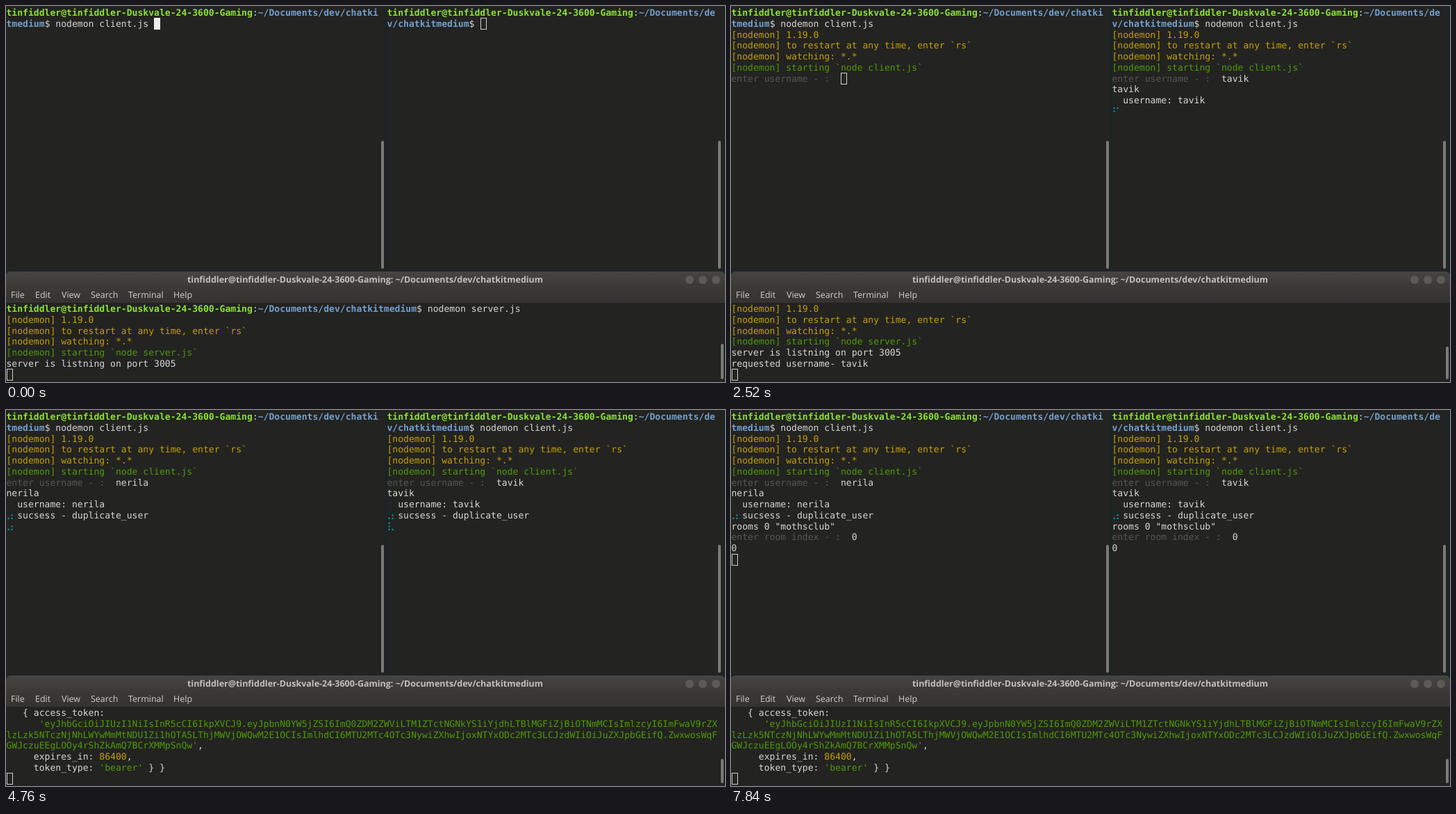
These frames come from a looping animation (1035 by 541 pixels, 8 s). An HTML page:

```html
<!DOCTYPE html>
<html lang="en">
<head>
<meta charset="utf-8">
<title>Terminal chat</title>
<style>
  html, body { margin: 0; width: 100%; height: 100%; overflow: hidden; background: #14262a; }
  #stage { position: relative; width: 1035px; height: 541px; overflow: hidden; text-rendering: geometricPrecision; }
  .pane, .bar, .cursor, #window, #title, .menu, .button { position: absolute; }
  .pane { top: 0; height: 381px; background: #232321; overflow: hidden; }
  #left { left: 0; width: 546px; }
  #right { left: 548px; width: 485px; }
  #server { left: 0; top: 427px; width: 1034px; height: 114px; }
  pre {
    position: absolute; left: .5px; top: 3px; margin: 0; color: #d6d8d2;
    font: 13.09px/15.77px "DejaVu Sans Mono", monospace;
  }
  #server pre { top: 2px; }
  .user { color: #8ae234; font-weight: bold; }
  .path { color: #729fcf; font-weight: bold; }
  .note { color: #c4a000; }
  .good { color: #4e9a06; }
  .dim { color: #555753; }
  svg { width: 7.88px; height: 15px; vertical-align: top; overflow: visible; fill: #06a0b4; }
  .cursor { box-sizing: border-box; width: 9px; height: 17px; border: 1px solid #d0d2cc; }
  .cursor.solid { background: #eeeeec; border-color: #eeeeec; }
  .bar { width: 4px; border-radius: 2px; background: #7a7a76; }
  #window {
    left: 0; top: 382px; width: 1035px; height: 45px; border-radius: 6px 6px 0 0;
    background: linear-gradient(#464541, #3a3935 24px, #343330);
    font: 12.5px/18px "Open Sans", sans-serif; color: #d2d0cb;
  }
  #title { left: 0; width: 1034px; top: 3px; text-align: center; font-weight: bold; color: #c2c0bb; white-space: pre; }
  .menu { top: 25px; }
  .button { top: 6px; width: 12px; height: 12px; border-radius: 50%; background: #5b5a56; }
</style>
</head>
<body>
<div id="stage">
  <div class="pane" id="left"></div>
  <div class="pane" id="right"></div>
  <div id="window"><div id="title"></div></div>
  <div class="pane" id="server"></div>
</div>
<script>
const LOOP = 8000, CELL = 7.88, ROW = 15.77;
const HOST = 'tinfiddler@tinfiddler-Duskvale-24-3600-Gaming';
const PATH = '~/Documents/dev/chatkitmedium';
const ROOM = 'mothsclub';
// Lit braille dots for each spinner position.
const SPIN = ['124', '145', '1456', '456', '3456', '356', '236', '1236', '123', '1234'];

const clients = {
  left: {
    name: 'nerila', wrap: 22, command: 0, run: 210, boot: [420, 490, 560],
    keys: [3010, 3150, 3290, 3430, 3570, 3710], enter: 4060,
    spin: 4340, spinFrom: 4340, step: 80, success: 4760, resume: 4340, spinEnd: 5740, clear: 6020,
    rooms: 6230, index: 6370, join: 6580, hidden: [[4060, 6230], [6860, 7000]]
  },
  right: {
    name: 'tavik', wrap: 14, command: 980, run: 1260, boot: [1400, 1400, 1610],
    keys: [2170, 2170, 2380, 2380, 2380], enter: 2450,
    spin: 2520, spinFrom: 2520, step: 72.5, success: 4340, resume: 4172, spinEnd: 5600, clear: 6230,
    rooms: 6230, index: 7350, join: 7490, hidden: [[1610, 1820], [2450, 6230], [7840, 8000]]
  }
};

const within = (t, [from, to]) => t >= from && t < to;
const span = (kind, text) => [kind, text];
const plain = text => [span('', text)];
const note = text => [span('note', '[nodemon] ' + text)];
const good = text => [span('good', '[nodemon] ' + text)];
const spinAt = (t, from, step) => span('spin', SPIN[Math.floor((t - from) / step) % SPIN.length]);

const bootNotes = [note('1.19.0'), note('to restart at any time, enter `rs`'), note('watching: *.*')];

function clientRows(t, c) {
  const rows = [
    [span('user', HOST), span('', ':'), span('path', PATH.slice(0, c.wrap))],
    [span('path', PATH.slice(c.wrap)), span('', '$ ' + (t >= c.command ? 'nodemon client.js ' : ''))]
  ];
  if (t < c.run) return rows;
  if (t >= c.boot[0]) rows.push(...bootNotes);
  if (t >= c.boot[1]) rows.push(good('starting `node client.js`'));
  if (t < c.boot[2]) return [...rows, []];

  const typed = c.name.slice(0, c.keys.filter(key => t >= key).length);
  rows.push([span('dim', 'enter username - :  '), span('', typed)]);
  if (t < c.enter) return rows;
  rows.push(plain(c.name), plain('  username: ' + c.name));

  if (t < c.spin) return rows;
  const first = spinAt(Math.min(t, c.success - 1), c.spinFrom, c.step);
  if (t < c.success) return [...rows, [first]];
  rows.push([first, span('', ' sucsess - duplicate_user')]);

  if (t < c.clear) return [...rows, [spinAt(Math.min(t, c.spinEnd), c.resume, 80)]];
  if (t < c.rooms) return rows;
  rows.push(plain(`rooms 0 "${ROOM}"`));
  rows.push([span('dim', 'enter room index - :  '), span('', t >= c.index ? '0' : '')]);
  if (t >= c.join) rows.push(plain('0'), []);
  return rows;
}

const tokenRows = [
  plain('   { access_token:'),
  [span('good', "      'eyJhbGciOiJIUzI1NiIsInR5cCI6IkpXVCJ9.eyJpbnN0YW5jZSI6ImQ0ZDM2ZWViLTM1ZTctNGNkYS1iYjdhLTBlMGFiZjBiOTNmMCIsImlzcyI6ImFwaV9rZX")],
  [span('good', 'lzLzk5NTczNjNhLWYwMmMtNDU1Zi1hOTA5LThjMWVjOWQwM2E1OCIsImlhdCI6MTU2MTc4OTc3NywiZXhwIjoxNTYxODc2MTc3LCJzdWIiOiJuZXJpbGEifQ.ZwxwosWqF')],
  [span('good', "GWJczuEEgLOOy4rShZkAmQ7BCrXMMpSnQw'"), span('', ',')],
  [span('', '     expires_in: '), span('note', '86400'), span('', ',')],
  [span('', '     token_type: '), span('good', "'bearer'"), span('', ' } }')]
];

// Each entry adds output to the server and moves its scrollbar.
const serverLog = [
  { at: 0, bar: 486, rows: [
    [span('user', HOST), span('', ':'), span('path', PATH), span('', '$ nodemon server.js')],
    ...bootNotes, good('starting `node server.js`'), plain('server is listning on port 3005')
  ] },
  { at: 2520, bar: 490, rows: [plain('requested username- ' + clients.right.name)] },
  { at: 4130, bar: 493, rows: [plain('requested username- ' + clients.left.name)] },
  { at: 4340, bar: 502, rows: tokenRows }
];

function spanHtml([kind, text]) {
  if (kind !== 'spin') return `<span class="${kind}">${text}</span>`;
  const dots = [...text].map(d => `<circle cx="${d > 3 ? 7.6 : 2.6}" cy="${2 + (d - 1) % 3 * 4.5}" r="1.15"/>`);
  return `<svg>${dots.join('')}</svg>`;
}

function makePane(id, barLeft, barTop, barEnd) {
  const pane = document.getElementById(id);
  const add = (tag, name) => {
    const node = document.createElement(tag);
    node.className = name;
    return pane.appendChild(node);
  };
  const text = add('pre', ''), cursor = add('div', 'cursor'), bar = add('div', 'bar');
  const top = id === 'server' ? 0 : 1.5;
  bar.style.left = barLeft + 'px';
  let shown = '';

  return (rows, focused, visible, barStart = barTop) => {
    const html = rows.map(row => row.map(spanHtml).join('')).join('\n');
    if (html !== shown) text.innerHTML = shown = html;
    const column = rows.at(-1).reduce((sum, [, part]) => sum + part.length, 0);
    cursor.style.left = column * CELL + .6 + 'px';
    cursor.style.top = (rows.length - 1) * ROW + top + 'px';
    cursor.className = focused ? 'cursor solid' : 'cursor';
    cursor.style.visibility = visible ? 'visible' : 'hidden';
    bar.style.top = barStart + 'px';
    bar.style.height = barEnd - barStart + 'px';
  };
}

function buildWindow() {
  const frame = document.getElementById('window');
  document.getElementById('title').textContent = `${HOST}: ${PATH}`;
  const add = (name, left, text) => {
    const node = document.createElement('div');
    node.className = name;
    node.style.left = left + 'px';
    node.textContent = text;
    frame.append(node);
  };
  Object.entries({ File: 7, Edit: 42, View: 80, Search: 122, Terminal: 176, Help: 241 })
    .forEach(([label, x]) => add('menu', x, label));
  [978, 997, 1016].forEach(x => add('button', x, ''));
}

buildWindow();
const draw = {
  left: makePane('left', 540, 194, 378),
  right: makePane('right', 477, 194, 378),
  server: makePane('server', 1029, 59, 110)
};

function render(t) {
  const focus = within(t, [700, 2800]) || t >= 7000 ? 'right' : 'left';
  for (const [side, c] of Object.entries(clients)) {
    draw[side](clientRows(t, c), side === focus, !c.hidden.some(gap => within(t, gap)));
  }
  const log = serverLog.filter(entry => t >= entry.at);
  const rows = log.flatMap(entry => entry.rows).slice(-6);
  draw.server([...rows, []], false, true, log.at(-1).bar - 427);
}

function tick() {
  render(performance.now() % LOOP);
  requestAnimationFrame(tick);
}
tick();
</script>
</body>
</html>
```
